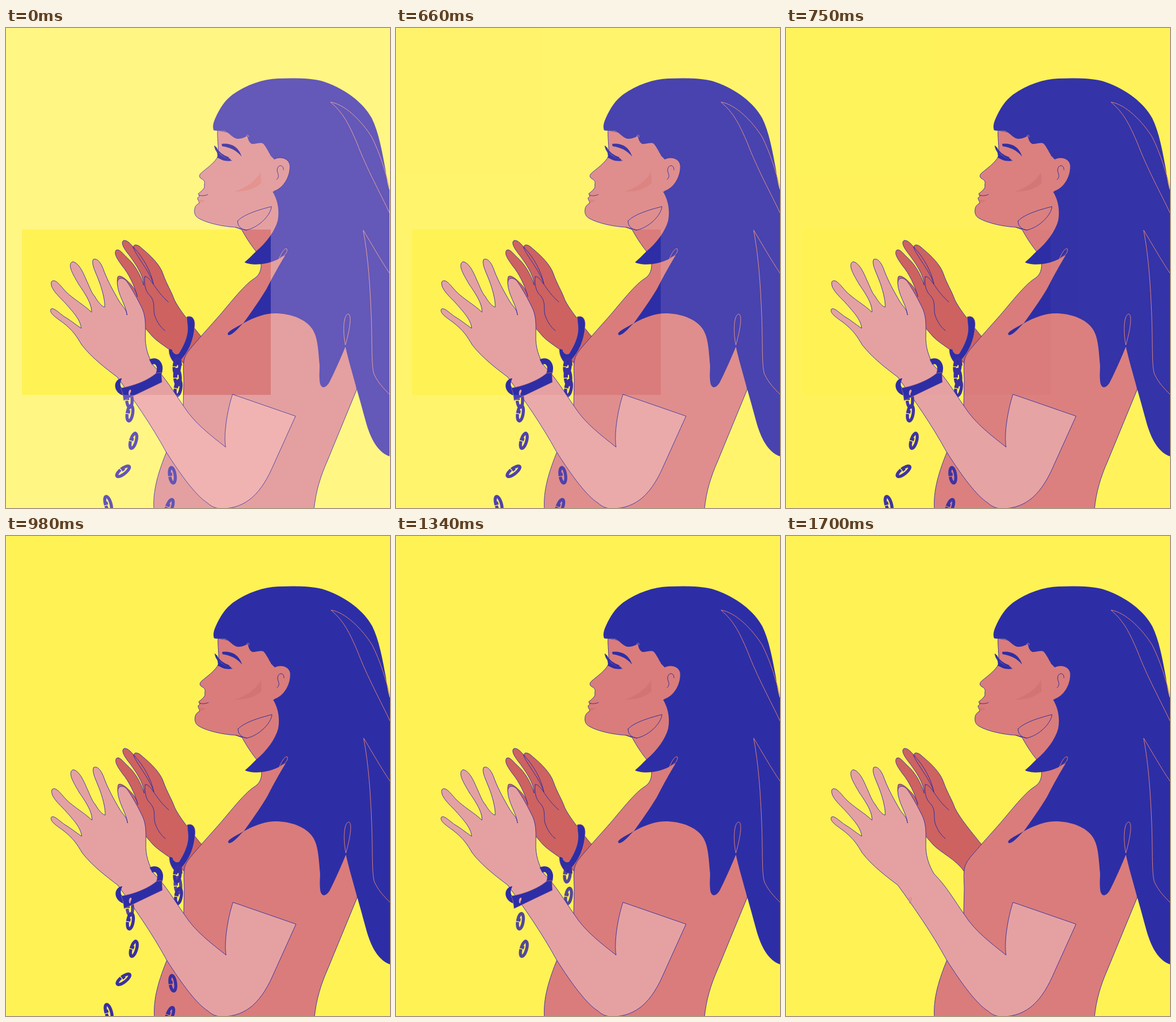
Write an HTML page that moves like this. It is 670 by 836 pixels and loops after 4700 ms.

```html
<!DOCTYPE html>
<html lang="en">
<head>
<meta charset="utf-8">
<title>Unchained</title>
<style>
html, body { margin: 0; width: 100%; height: 100%; overflow: hidden; background: #fff255; }
svg {
  display: block; width: 100%; height: 100%;
  --paper: #fff255; --skin: #da7c7b; --arm: #e5a1a2; --far: #cd6261; --blush: #d17473;
  --hair: #2d2ea5; --line: #2d2ea5; --link: #3a2fa2;
}
#veil {
  --paper: #fff684; --skin: #e4a0a0; --arm: #f0b3b1; --far: #da8c8a; --blush: #e5938f;
  --hair: #6458b8; --line: #4a40a8; --link: #6454b6;
}
.paper { fill: var(--paper); }
.skin { fill: var(--skin); }
.arm { fill: var(--arm); }
.far { fill: var(--far); }
.blush { fill: var(--blush); }
.ink { fill: var(--hair); }
.look { fill: var(--line); }
.edge { stroke: var(--line); stroke-width: .9; stroke-linejoin: round; }
.line { fill: none; stroke: var(--line); stroke-linecap: round; }
.strand { fill: none; stroke: var(--skin); }
.link { fill: none; stroke: var(--link); stroke-width: 5.4; }
.rim { stroke: var(--skin); stroke-width: .6; }
</style>
</head>
<body>
<svg viewBox="0 0 670 836" preserveAspectRatio="none">
  <defs>
    <clipPath id="outside"><path clip-rule="evenodd" d="M1 0H670V836H1ZM28 351V639H462V351Z"/></clipPath>
  </defs>
  <g id="scene">
    <rect class="paper" width="670" height="836"/>
    <g id="figure">
      <!-- far hand -->
      <path class="far edge" d="M312 586C297 563 270 552 256 537L244 523L212 485C200 465 192 445 196 433C201 429 212 439 219 447C226 455 229 462 230 468C225 448 214 427 204 415C196 404 188 393 193 387C198 384 204 392 211 399C226 412 236 431 241 448C241 432 227 411 216 396C207 385 200 374 206 370C213 369 219 377 225 384C220 377 229 375 237 383C254 397 270 413 275 429C281 446 290 460 294 472C302 490 325 517 345 542Z"/>
      <path class="line" d="M222 381C227 394 243 414 250 428C255 437 257 442 258 446C254 425 240 399 225 384M243 433C253 431 260 457 284 477M243 433C241 445 244 459 252 466C262 477 257 489 260 500C264 511 269 520 278 527"/>

      <!-- head and torso -->
      <path class="skin edge" d="M370 178C369 188 372 208 371 223C365 235 350 245 342 252C337 256 338 260 341 262C347 265 348 268 347 272L347 278C343 284 338 287 336 289C339 291 339 293 335 296C335 299 338 302 338 305C333 308 331 310 330 315C329 322 330 328 338 332C352 340 380 346 401 347L412 351C420 366 429 379 437 389L446 412C446 425 441 432 433 437C414 449 387 486 365 510L341 537C331 549 320 560 315 569C308 580 311 600 311 615L310 658L281 738C268 770 256 805 259 840L538 840C541 807 550 780 561 755L613 629L595 540L500 380L480 200Z"/>
      <path class="blush" d="M399 285C420 278 435 268 445 251L446 270C435 281 418 285 399 285Z"/>
      <path class="blush" d="M337 299L348 300C345 304 341 304 338 304Z"/>
      <path class="line" d="M337 291C343 293 349 292 353 290"/>

      <!-- eye and brow -->
      <path class="look" d="M377 202C391 200 406 205 412 224C402 212 391 208 378 206Z"/>
      <path class="look" d="M369 216C374 222 384 227 396 231C386 233 375 231 370 224Z"/>
      <path class="line" d="M365 206C367 215 372 221 381 226M367 208C371 217 378 222 389 226M371 215C377 221 384 226 392 229M370 225L384 230" stroke-width="1.9"/>

      <!-- hair -->
      <path class="ink" d="M363 178C361 172 362 166 366 157C374 139 383 126 396 116C421 98 450 89 475 88C505 87 535 87 557 94C594 107 624 130 639 157C651 181 657 215 663 247C665 262 667 274 670 282V746C646 738 634 707 627 680C616 638 601 590 593 555C587 570 574 600 565 617C559 628 549 630 548 614C547 605 548 597 548 588C545 552 544 533 531 519C516 503 491 497 470 497C450 497 427 507 414 515C406 522 398 534 389 535C382 530 404 521 415 514C425 500 441 478 455 455C468 430 478 412 488 396L480 400C462 412 430 415 417 408C424 402 430 396 437 389C455 374 470 354 475 335C478 317 475 300 466 285L462 221C458 215 455 207 449 201C445 199 438 202 430 202C425 200 423 194 422 188C418 190 412 193 406 193C398 193 392 185 386 181C380 177 370 180 363 178Z"/>
      <path class="skin edge" d="M462 222L468 229C478 223 493 226 496 238C498 256 486 280 466 285"/>
      <path class="skin" d="M459 219L469 229L468 285L455 285Z"/>
      <path class="line" d="M485 247C485 236 473 238 474 249C475 254 479 259 473 264"/>
      <path class="line" d="M405 336C415 325 440 317 464 311C463 325 443 347 420 352C412 351 404 345 405 336ZM401 347L420 352"/>
      <path class="strand" d="M567 129C593 133 622 163 639 190C653 218 663 250 670 278M567 129C590 148 600 170 613 200C630 245 655 290 670 322M624 352C638 375 655 405 670 427M624 352C633 400 636 450 638 500C640 550 638 590 643 603C650 618 660 628 670 638M593 552C589 535 588 500 598 498C605 500 600 528 593 552M477 402C482 390 488 382 491 385C492 390 488 396 480 400M420 189C421 185 425 186 424 190"/>

      <path class="cuff ink rim" d="M316 503C324 500 331 505 330 518C329 545 318 565 307 577L308 588L298 587C290 580 284 570 285 558L291 560C291 565 296 570 302 567C313 550 320 532 317 515Z"/>
      <g id="farChain"></g>

      <!-- near arm -->
      <path class="arm edge" d="M132 523C120 515 112 508 103 503C94 497 83 485 79 490C76 497 89 505 100 513C118 527 124 537 133 552C150 574 175 593 195 608C222 645 255 692 280 738C308 782 333 815 352 827C361 835 368 837 378 837C400 837 417 829 430 818C447 803 458 783 468 760L506 676L396 638C387 665 380 708 384 730C359 710 330 689 311 659C294 635 280 610 258 588C249 573 243 555 244 535C244 518 245 505 239 490C232 475 221 455 212 442C205 433 195 434 195 445C196 465 210 482 212 500C211 490 205 486 199 477C189 460 179 442 172 424C167 409 160 400 153 403C149 410 157 425 162 438C168 453 174 475 173 486C169 486 161 477 156 468C149 460 146 449 141 439C135 425 128 409 117 407C106 412 120 433 128 447C137 460 151 480 150 495C138 483 118 472 105 459C95 448 86 435 80 442C77 454 94 468 105 480C117 494 131 508 132 523Z"/>
      <path class="strand" d="M216 640C213 632 218 627 219 631C219 634 217 634 218 638"/>
      <g id="nearChain"></g>
      <g class="cuff">
        <path d="M253 582C264 576 273 587 267 603" fill="none" stroke="var(--hair)" stroke-width="10"/>
        <path class="ink" d="M203 610C187 612 187 634 205 640L203 627C198 622 201 615 203 610Z"/>
        <path class="ink rim" d="M201 627C225 623 249 613 263 601L272 600L273 617L206 649L204 635Z"/>
        <path class="arm" d="M215 639C213 631 219 627 219 632C219 635 217 635 217 640Z"/>
      </g>
    </g>
  </g>
  <!-- the same scene in paler colours, around the clear rectangle -->
  <g id="veil" clip-path="url(#outside)"><use href="#scene"/></g>
  <rect width="1" height="836" fill="#fff684"/>
</svg>
<script>
const LOOP = 4700, STEP = 30;
const $ = id => document.getElementById(id);
const figure = $('figure'), veil = $('veil');
const cuffs = [...document.querySelectorAll('.cuff')];

// x, y, tilt, fade group
const nearLinks = [[216, 647, -3, 0], [217, 671, 9, 2], [223, 719, 16, 2], [205, 772, 52, 1], [179, 829, -16, 1], [291, 779, -8, 1], [286, 834, 20, 1]];
const farLinks = [[300, 608, -4, 0], [299, 589, 6, 2], [301, 627, 9, 2]];
const groups = [[], [], []];

function addLink(parent, [x, y, tilt, group]) {
  const p = document.createElementNS('http://www.w3.org/2000/svg', 'path');
  p.setAttribute('class', 'link');
  p.setAttribute('d', 'M-4.7 2A4.8 13.6 0 1 0 -4.7 -2L0 -2');
  p.setAttribute('transform', `translate(${x} ${y}) rotate(${tilt})`);
  parent.appendChild(p);
  groups[group].push(p);
}
nearLinks.forEach(l => addLink($('nearChain'), l));
farLinks.forEach(l => addLink($('farChain'), l));

// Opacity that drops in equal steps, the first one at the start time
function fade(t, start, steps) {
  const done = Math.floor((t - start) / STEP) + 1;
  return 1 - Math.min(Math.max(done / steps, 0), 1);
}

function setOpacity(parts, value) {
  parts.forEach(p => p.setAttribute('opacity', value));
}

function draw(t) {
  figure.setAttribute('transform', `translate(${t < 630 ? -.8 : 0} 0)`);
  setOpacity([veil], fade(t, 570, 8));
  [980, 1130, 1340].forEach((start, i) => setOpacity(groups[i], fade(t, start, 8)));
  setOpacity(cuffs, fade(t, 1520, 7));
}

const begin = performance.now();
function tick() {
  draw((performance.now() - begin) % LOOP);
  requestAnimationFrame(tick);
}
tick();
</script>
</body>
</html>
```
